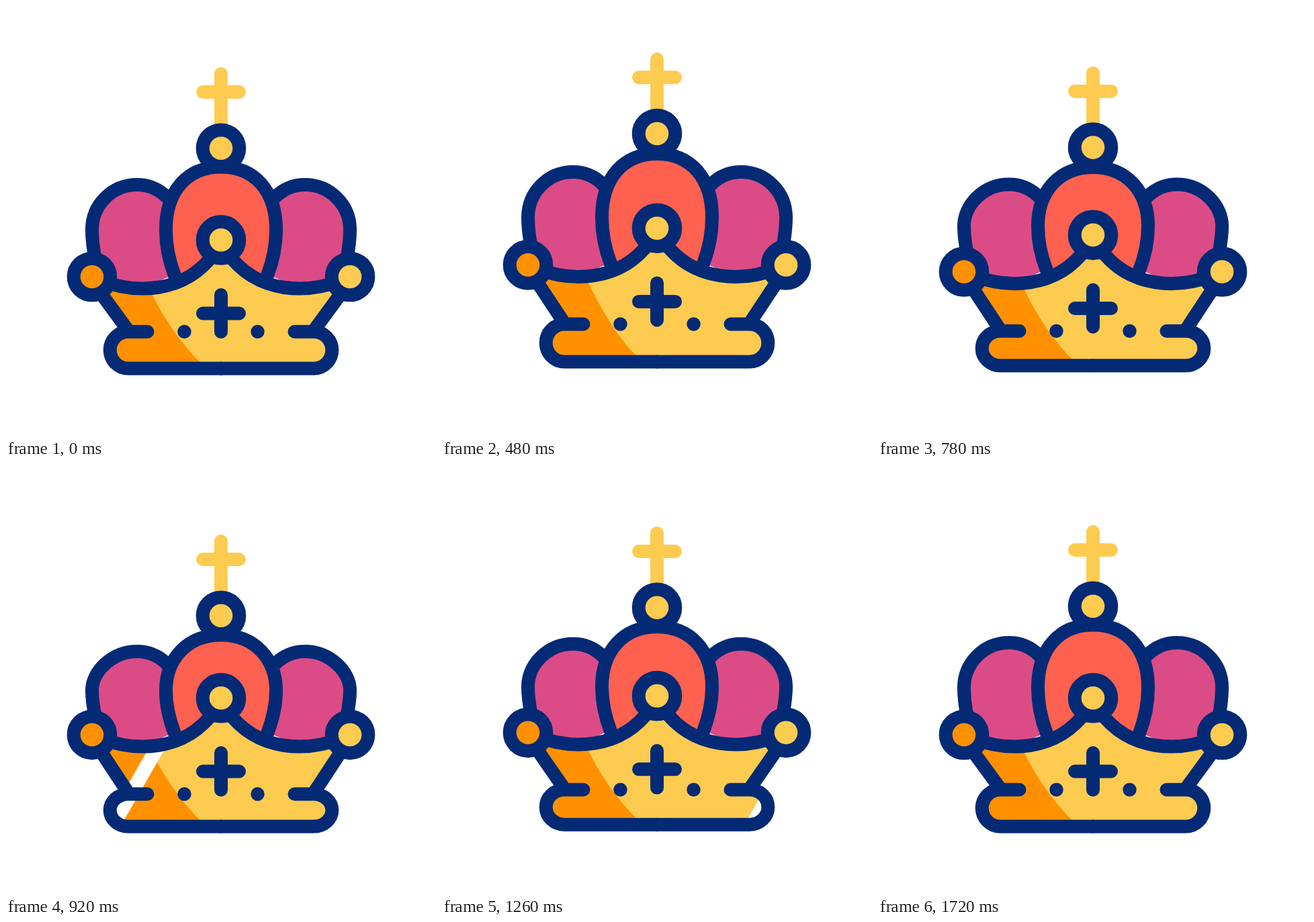
An HTML page with a canvas that plays this animation: 640x640 px, repeating every 2400 ms.

```html
<!DOCTYPE html>
<html lang="en">
<head>
<meta charset="utf-8">
<title>Bouncing crown</title>
<style>
html, body { margin: 0; width: 100%; height: 100%; overflow: hidden; background: #fff; }
canvas { display: block; width: 640px; height: 640px; }
</style>
</head>
<body>
<canvas id="stage" width="640" height="640"></canvas>
<script>
const ctx = document.getElementById('stage').getContext('2d');
const LOOP = 2400;
const NAVY = '#042a75', GOLD = '#fdcb50', ORANGE = '#ff9100', RED = '#ff6150', PINK = '#db4c86';

// Vertical offset of each part at every key time, eased in between.
const TIMES = [150, 320, 555, 920, 1075, 1400, 1720];
const OFFSETS = {
  orb:   [0, 13.5, -32.5, 14, -12.5, 11.5, 0],
  dome:  [0, 14.5, -30, 15, -7.5, 9.3, 0],
  side:  [0, 12.5, -28.6, 13, -8, 8, 0],
  rim:   [0, 0, -23, 0, -6.5, -1, 0],
  notch: [0, 6.5, -16.6, 6.5, -4, 2.7, 0],
  base:  [0, 0, -13, 0, -6, -0.8, 0]
};

function offset(part, t) {
  const values = OFFSETS[part];
  const i = TIMES.findIndex(time => time > t);
  if (i < 1) return 0;
  const u = (t - TIMES[i - 1]) / (TIMES[i] - TIMES[i - 1]);
  return values[i - 1] + (values[i] - values[i - 1]) * u * u * (3 - 2 * u);
}

function draw(d, fill, stroke) {
  const path = new Path2D(d);
  if (fill) { ctx.fillStyle = fill; ctx.fill(path); }
  if (stroke) { ctx.strokeStyle = stroke; ctx.stroke(path); }
}

function circle(x, y, r, fill, stroke) {
  ctx.beginPath();
  ctx.arc(x, y, r, 0, Math.PI * 2);
  ctx.fillStyle = fill;
  ctx.fill();
  if (stroke) { ctx.strokeStyle = stroke; ctx.stroke(); }
}

const knob = (x, y, fill) => circle(x, y, 27.3, fill, NAVY);

function bothSides(paint) {
  paint();
  ctx.save();
  ctx.transform(-1, 0, 0, 1, 640, 0);
  paint();
  ctx.restore();
}

function render(t) {
  const [orb, dome, side, rim, notch, base] = Object.keys(OFFSETS).map(part => offset(part, t));
  ctx.clearRect(0, 0, 640, 640);
  ctx.lineWidth = 20;
  ctx.lineCap = ctx.lineJoin = 'round';

  // Cross and orb
  draw(`M320 ${101 + orb}V${190 + orb}M293 ${128 + orb}H347`, null, GOLD);
  knob(320, 211.7 + orb, GOLD);

  // Cushions
  const sideMid = 333 + rim + (side - rim) * 0.3;
  bothSides(() => {
    const outline = `M133 ${378 + rim}C129 ${357 + rim} 128 ${sideMid + 12} 128 ${sideMid}
      C128 ${296 + side} 158 ${266 + side} 195 ${266 + side}
      C212 ${266 + side} 228 ${273 + side} 240 ${285 + side}`;
    draw(`${outline}L250 ${400 + rim}L200 ${421 + rim}L140 ${409 + rim}Z`, PINK);
    draw(outline, null, NAVY);
  });
  const mid = 333 + rim + (dome - rim) * 0.3;
  const top = 239.5 + dome;
  draw(`M251 ${401 + rim}C243 ${380 + rim} 238 ${mid + 22} 238 ${mid}
    C238 ${275 + dome} 270 ${top} 320 ${top}
    C370 ${top} 402 ${275 + dome} 402 ${mid}
    C402 ${mid + 22} 397 ${380 + rim} 389 ${401 + rim}`, RED, NAVY);

  // Band
  const bar = 484.7 + notch;
  const floor = 539.5 + base;
  const round = `27.3 ${(floor - bar) / 2} 0 0 0`;
  const band = `M140 ${408 + rim}C190 ${428 + rim} 265 ${430 + rim} 310 ${368 + rim}H330
    C375 ${430 + rim} 450 ${428 + rim} 500 ${408 + rim}V${426 + rim}L457 ${bar}
    A27.3 ${(floor - bar) / 2} 0 0 1 458 ${floor}H182A27.3 ${(floor - bar) / 2} 0 0 1 182 ${bar}
    L140 ${426 + rim}Z`;
  draw(band, GOLD);
  ctx.save();
  ctx.clip(new Path2D(band));
  draw(`M100 ${380 + rim}H200L218 ${430 + rim}
    C234 ${463 + rim} 260 ${502 + base} 290 ${531 + base}V560H100Z`, ORANGE);
  if (t > 860 && t < 1300) {
    const x = 151 + (t - 920) * 0.89;
    draw(`M${x} 529l80 -140h24.5l-80 140l-12 21h-24.5Z`, '#fff');
  }
  ctx.restore();

  bothSides(() => draw(`M140 ${408 + rim}C190 ${428 + rim} 265 ${430 + rim} 310 ${368 + rim}
    M140 ${426 + rim}L183 ${bar}
    M210.5 ${bar}H182A${round} 182 ${floor}H320`, null, NAVY));
  draw(`M320 ${430 + rim}V${485 + rim}M293 ${457.5 + rim}H347`, null, NAVY);
  bothSides(() => circle(265.5, bar, 10.2, NAVY));

  knob(128, 403 + rim, ORANGE);
  knob(512, 403 + rim, GOLD);
  knob(320, 348.3 + rim, GOLD);
}

function tick() {
  render(performance.now() % LOOP);
  requestAnimationFrame(tick);
}
tick();
</script>
</body>
</html>
```
